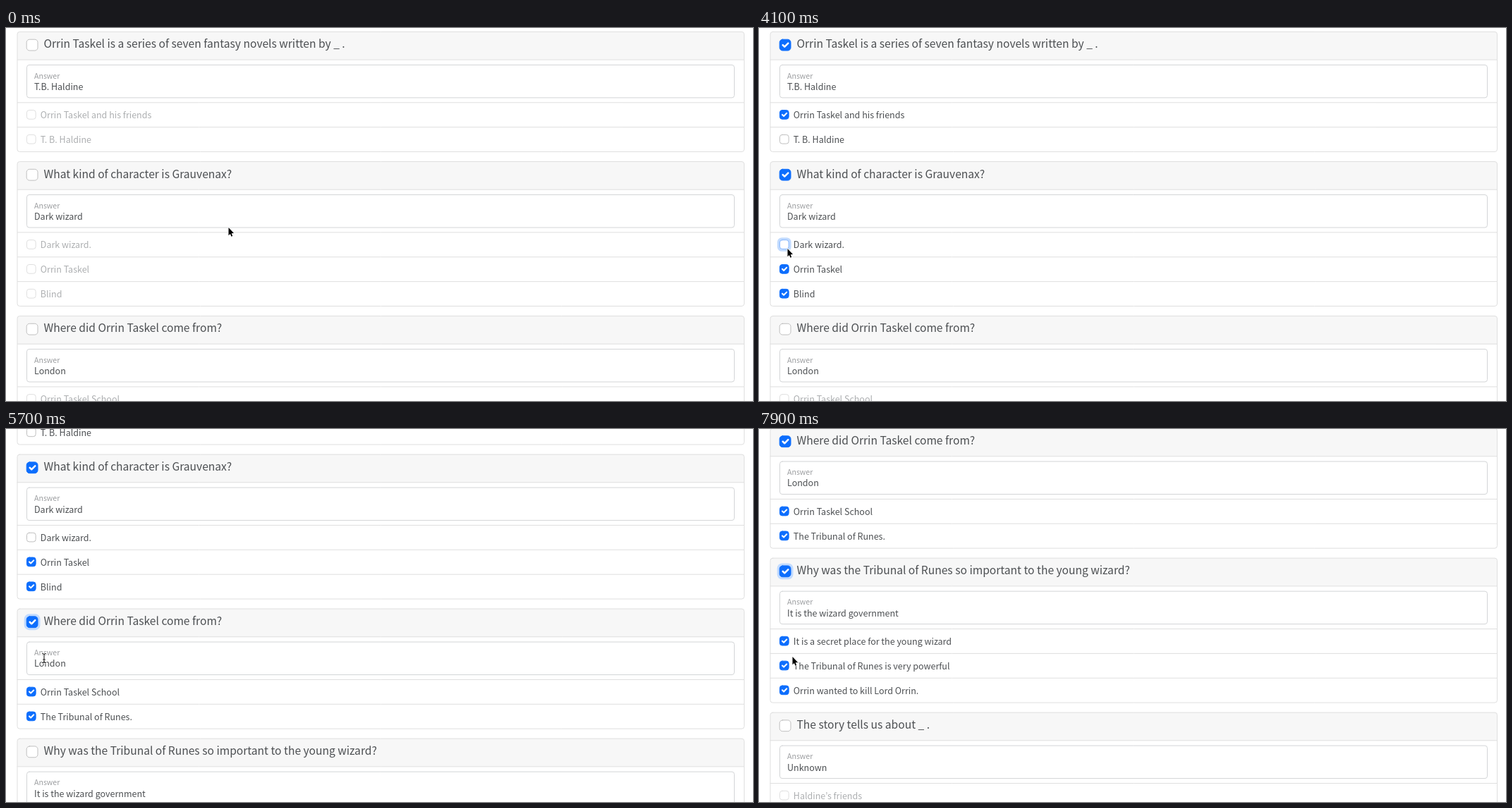
Animation, 1059 px wide and 529 px high, one loop 8 s. Source, as an HTML page with a canvas:

```html
<!DOCTYPE html>
<html lang="en">
<head>
<meta charset="utf-8">
<title>Question picker</title>
<style>
  html, body { margin: 0; width: 100%; height: 100%; overflow: hidden; background: #fff; }
  canvas { display: block; }
</style>
</head>
<body>
<canvas id="stage" width="1059" height="529"></canvas>
<script>
const ctx = document.getElementById('stage').getContext('2d');
const W = 1059, H = 529, LOOP = 8000, STEP = 100;
const FONT = '"Noto Sans CJK JP", "Noto Sans CJK SC", "Noto Sans", sans-serif';
const LEFT = 16, WIDTH = 1030.5, TOP = 5.4;
const HEAD = 39.7, ANSWER = 60.7, ROW = 34.85, GAP = 14;
const BLUE = '#0d6efd', INK = '#4c4f52', MUTED = '#adafb1', HEADER = -1;

const cards = [
  { title: 'Orrin Taskel is a series of seven fantasy novels written by _ .', answer: 'T.B. Haldine',
    rows: ['Orrin Taskel and his friends', 'T. B. Haldine'] },
  { title: 'What kind of character is Grauvenax?', answer: 'Dark wizard',
    rows: ['Dark wizard.', 'Orrin Taskel', 'Blind'] },
  { title: 'Where did Orrin Taskel come from?', answer: 'London',
    rows: ['Orrin Taskel School', 'The Tribunal of Runes.'] },
  { title: 'Why was the Tribunal of Runes so important to the young wizard?',
    answer: 'It is the wizard government',
    rows: ['It is a secret place for the young wizard', 'The Tribunal of Runes is very powerful',
      'Orrin wanted to kill Lord Orrin.'] },
  { title: 'The story tells us about _ .', answer: 'Unknown', rows: ['Haldine’s friends'] }
];

// A header click ticks the whole card, a row click clears that row.
const clicks = [
  { at: 800, card: 0, row: HEADER },
  { at: 1500, card: 0, row: 1 },
  { at: 2600, card: 1, row: HEADER },
  { at: 3800, card: 1, row: 0 },
  { at: 5000, card: 2, row: HEADER },
  { at: 7100, card: 3, row: HEADER }
];

const scrolls = [
  { from: 4200, to: 4800, pos: [101.5] },
  { from: 5100, to: 5700, pos: [153.4] },
  { from: 5900, to: 6300, pos: [345.2] },
  { from: 7100, to: 7900, pos: [409.4] }
];

const moves = [
  { from: 0, to: 800, pos: [38, 23] },
  { from: 1000, to: 1500, pos: [38, 158] },
  { from: 1500, to: 1800, pos: [34.5, 205] },
  { from: 2800, to: 3400, pos: [37, 325] },
  { from: 3400, to: 3700, pos: [40, 313] },
  { from: 4500, to: 4800, pos: [40, 322] },
  { from: 5100, to: 5400, pos: [54, 325] },
  { from: 6400, to: 6800, pos: [38, 262] },
  { from: 7100, to: 7700, pos: [47, 323] }
];

const easeOut = p => 1 - (1 - p) ** 1.55;

// Runs through eased moves, each starting where the last one ended.
function follow(list, start, t) {
  return list.reduce((pos, m) => {
    const p = easeOut(Math.min(1, Math.max(0, (t - m.from) / (m.to - m.from))));
    return pos.map((v, i) => v + (m.pos[i] - v) * p);
  }, start);
}

function text(str, x, y, size, color) {
  ctx.font = `300 ${size}px ${FONT}`;
  ctx.fillStyle = color;
  ctx.fillText(str, x, y);
}

function box(x, y, w, h, r) {
  ctx.beginPath();
  ctx.roundRect(x, y, w, h, r);
}

function line(y) {
  ctx.beginPath();
  ctx.moveTo(LEFT, y);
  ctx.lineTo(LEFT + WIDTH, y);
  ctx.stroke();
}

function checkbox(cx, cy, size, { checked, focused, enabled }) {
  const x = cx - size / 2, y = cy - size / 2, u = size / 20;
  if (focused) {
    box(x - 3, y - 3, size + 6, size + 6, size / 4 + 3);
    ctx.fillStyle = '#c2dbfe';
    ctx.fill();
  }
  box(x + .5, y + .5, size - 1, size - 1, size / 4);
  ctx.fillStyle = checked ? BLUE : '#fff';
  ctx.strokeStyle = checked ? BLUE : focused ? '#86b7fe' : enabled ? '#bfbfbf' : '#dfdfdf';
  ctx.lineWidth = 1;
  ctx.fill();
  ctx.stroke();
  if (!checked) return;
  ctx.beginPath();
  ctx.moveTo(x + 6 * u, y + 10 * u);
  ctx.lineTo(x + 9 * u, y + 13 * u);
  ctx.lineTo(x + 15 * u, y + 7 * u);
  ctx.strokeStyle = '#fff';
  ctx.lineWidth = 3 * u;
  ctx.lineCap = ctx.lineJoin = 'round';
  ctx.stroke();
}

const cardHeight = card => HEAD + ANSWER + ROW * card.rows.length;

function drawCard(card, index, y, done) {
  const last = done[done.length - 1];
  const clicked = row => done.some(c => c.card === index && c.row === row);
  const focused = row => !!last && last.card === index && last.row === row;
  const on = clicked(HEADER);
  const rowTop = i => y + HEAD + ANSWER + ROW * i;

  ctx.lineWidth = 1;
  box(LEFT, y, WIDTH, HEAD, [3.5, 3.5, 0, 0]);
  ctx.fillStyle = '#f7f7f7';
  ctx.fill();
  box(LEFT, y, WIDTH, cardHeight(card), 3.5);
  ctx.strokeStyle = '#dfdfdf';
  ctx.stroke();
  line(y + HEAD);
  card.rows.forEach((_, i) => line(rowTop(i)));

  box(29.5, y + 47, 1003, 46.5, 3.5);
  ctx.strokeStyle = '#d3d5d7';
  ctx.stroke();
  text('Answer', 40, y + 66.2, 10.6, '#9c9ea0');
  text(card.answer, 40, y + 82.4, 12.5, INK);

  checkbox(37.1, y + 18.7, 16.8, { checked: on, focused: focused(HEADER), enabled: true });
  text(card.title, 53.5, y + 23, 15.6, INK);

  card.rows.forEach((label, i) => {
    const top = rowTop(i);
    checkbox(35.8, top + 17.1, 13.7, { checked: on && !clicked(i), focused: focused(i), enabled: on });
    text(label, 48.8, top + 22.4, 12.5, on ? INK : MUTED);
  });
}

function arrow(x, y) {
  ctx.save();
  ctx.translate(x, y);
  ctx.beginPath();
  [[.5, 0], [.5, 11.2], [2.9, 9], [4.5, 12.7], [6.2, 12], [4.7, 8.3], [8, 8]]
    .forEach(p => ctx.lineTo(...p));
  ctx.closePath();
  ctx.strokeStyle = '#fff';
  ctx.lineWidth = 1.6;
  ctx.stroke();
  ctx.fillStyle = '#000';
  ctx.fill();
  ctx.restore();
}

function beam(x, y) {
  for (const [color, width] of [['#fff', 2.6], ['#222', 1.1]]) {
    ctx.beginPath();
    for (const s of [-1, 1]) {
      ctx.moveTo(x - 2.5, y + 6.5 * s);
      ctx.quadraticCurveTo(x, y + 6.5 * s, x, y + 4.5 * s);
      ctx.quadraticCurveTo(x, y + 6.5 * s, x + 2.5, y + 6.5 * s);
    }
    ctx.moveTo(x, y - 5);
    ctx.lineTo(x, y + 5);
    ctx.moveTo(x - 1.5, y + 2);
    ctx.lineTo(x + 1.5, y + 2);
    ctx.strokeStyle = color;
    ctx.lineWidth = width;
    ctx.stroke();
  }
}

function draw(t) {
  ctx.fillStyle = '#fff';
  ctx.fillRect(0, 0, W, H);
  const done = clicks.filter(c => c.at <= t);
  let y = TOP - follow(scrolls, [0], t)[0];
  cards.forEach((card, i) => {
    drawCard(card, i, y, done);
    y += cardHeight(card) + GAP;
  });
  const pointer = t >= 5400 && t < 6500 ? beam : arrow;
  pointer(...follow(moves, [315, 283], t));
}

function tick(now) {
  draw(Math.floor(now % LOOP / STEP) * STEP);
  requestAnimationFrame(tick);
}
requestAnimationFrame(tick);
</script>
</body>
</html>
```
